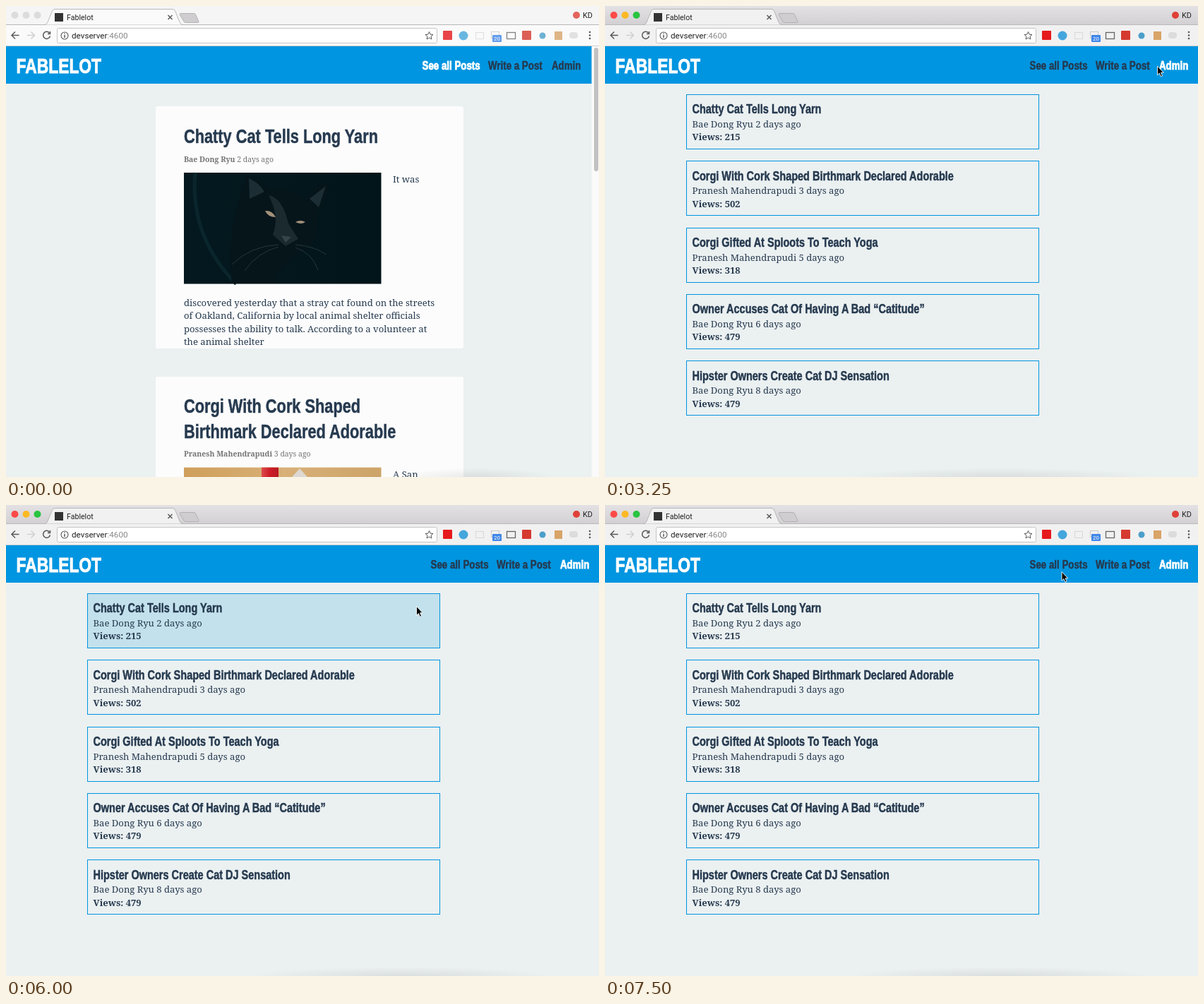
Animation of 840x667 px, one loop 8 s. Source, as an HTML page:

```html
<!DOCTYPE html>
<html lang="en">
<head>
<meta charset="utf-8">
<title>Blog admin walkthrough</title>
<style>
  html, body { margin: 0; width: 100%; height: 100%; overflow: hidden; background: #ebf0f1; }
  svg { display: block; width: 840px; height: 667px; }
  text { fill: #263a4f; white-space: pre; }
  .ui { font-family: Roboto, "Liberation Sans", sans-serif; fill: #222; }
  .display { font-family: "Liberation Sans", Arial, sans-serif; font-weight: bold; stroke: #263a4f; stroke-width: .5px; }
  .active { fill: #fff; stroke: #fff; stroke-width: .9px; }
  .serif { font-family: "Noto Serif", serif; font-size: 13.1px; }
  .bold { font-weight: bold; }
  .byline { font-size: 10.5px; fill: #747474; }
  .line { fill: none; stroke: #5a5a5a; stroke-width: 1.5; }
</style>
</head>
<body>
<svg id="stage" viewBox="0 0 840 667"></svg>
<script>
const LOOP = 8000, BLUE = '#0095e0', CONDENSED = .775;
const SITE = 'Fablelot', CAT_AUTHOR = 'Bae Dong Ryu', DOG_AUTHOR = 'Pranesh Mahendrapudi';

const rect = (x, y, w, h, fill, more = '') =>
  `<rect x="${x}" y="${y}" width="${w}" height="${h}" fill="${fill}" ${more}/>`;
const circle = (x, y, r, fill, more = '') =>
  `<circle cx="${x}" cy="${y}" r="${r}" fill="${fill}" ${more}/>`;
const path = (d, fill, more = '') => `<path d="${d}" fill="${fill}" ${more}/>`;
const line = (d, more = '') => `<path d="${d}" class="line" ${more}/>`;
const text = (str, x, y, cls, more = '') => `<text x="${x}" y="${y}" class="${cls}" ${more}>${str}</text>`;
const display = (str, x, y, size, cls = '') =>
  `<text class="display ${cls}" font-size="${size}" transform="translate(${x} ${y}) scale(${CONDENSED} 1)">${str}</text>`;
const bottomShade = (x, radius) => `<ellipse cx="${x}" cy="668" rx="${radius}" ry="14" fill="url(#shade)"/>`;

// Browser window
const lights = colors => colors.map((c, i) => circle(12.5 + i * 16, 13, 5, c)).join('');
const frame = (strip, bar, lightColors, iconOpacity) =>
  rect(0, 0, 840, 27, strip) + rect(0, 26, 840, 1, '#b9b7b9') + lights(lightColors) +
  path('M246 12q0-1.500 2-1.500h18q2 0 2.500 1.500l4.500 10q.5 1.500-1.500 1.500h-17q-2 0-2.500-1.500z', '#cfcdcf',
    'stroke="#aaa" stroke-width=".8"') +
  path('M54 27q4-1 5-4l6-15q1-3.500 4-3.500h167q3 0 4 3.500l6 15q1 3 5 4z', bar, 'stroke="#aaa" stroke-width=".8"') +
  rect(0, 27, 840, 30, bar) + rect(0, 56, 840, 1, '#cfcfcf') +
  `<g opacity="${iconOpacity}">${extensions}</g>`;

const extensions =
  rect(619, 35, 13, 13, '#e6191c', 'rx="1"') + circle(648, 42, 6.5, '#45a6dc') +
  rect(665.5, 37.5, 11, 9, 'none', 'stroke="#d8d8d8"') +
  rect(687.5, 36.5, 11, 9, 'none', 'stroke="#c8c8c8"') +
  rect(689, 41, 13, 10, '#3f86e8', 'rx="1"') + text('20', 691, 49, 'ui', 'font-size="8" style="fill:#fff"') +
  rect(709.5, 37.5, 12, 9, 'none', 'stroke="#666" stroke-width="1.3"') +
  rect(731, 35, 13, 13, '#d5392f', 'rx="1"') + circle(760, 42, 4.5, '#4c9fca') +
  rect(777, 36, 11, 12, '#d8a468') + rect(798, 37, 12, 9, '#dcdcdc', 'rx="4"') +
  circle(808, 13, 5, '#df4038');

const controls =
  rect(69, 10, 12, 12, '#333') + text(SITE, 86, 19.5, 'ui', 'font-size="10.6"') +
  line('M229.500 13l6 6m0-6l-6 6', 'stroke-width="1.2"') +
  text('KD', 817, 17, 'ui', 'font-size="10.8"') +
  line('M18.500 41.500H8m5-5l-5 5 5 5') + line('M30 41.500h10.500m-5-5l5 5-5 5', 'style="stroke:#d0d0d0"') +
  line('M61.500 38.200a5 5 0 1 0 1 4.300M62.500 36v3.500h-3.500') +
  rect(72.5, 31.5, 538, 21, '#fff', 'rx="2" stroke="#c4c4c4"') +
  line('M83 41v4m0-6.500v1.300', 'stroke-width="1.2"') + circle(83, 42, 5, 'none', 'stroke="#555" stroke-width="1.1"') +
  text('devserver<tspan fill="#888">:4600</tspan>', 93, 45.5, 'ui', 'font-size="11.7"') +
  path('M599.500 36.500l1.600 3.600 3.900.4-2.900 2.600.8 3.900-3.400-2-3.400 2 .8-3.900-2.900-2.600 3.900-.4z', 'none', 'stroke="#555"') +
  [37, 41.5, 46].map(y => circle(827, y, 1.3, '#555')).join('');

// Site pages
const header = (navX, active) => rect(0, 57, 840, 53, BLUE) +
  display(SITE.toUpperCase(), 14.5, 94.5, 29.5, 'active') +
  ['See all Posts', 'Write a Post', 'Admin'].map((label, i) =>
    display(label, navX + [0, 93.5, 183.5][i], 90.2, 17.2, i === active ? 'active' : '')).join('');

const byline = (author, age, y) =>
  text(`<tspan class="bold">${author}</tspan> ${age}`, 252, y, 'serif byline');

const catPhoto = rect(252, 236, 279.5, 157.5, 'url(#night)') +
  path('M268 236q-8 90 58 157.500', 'none', 'stroke="#0a262c" stroke-width="5"') +
  path('M320 393q-10-70 22-155 18 6 32 22 28-4 50 12 14-20 34-22-2 24-16 44 4 52-34 60-20 10-26 39z', '#06151a') +
  path('M344 244q14 6 22 19l-21 10zM453 255l-23 18 13 12z', '#1c2e33') +
  path('M372 268q20 4 28 40l14 22-18 10-18-16q10-26-6-56z', '#1b2a2e') +
  path('M367 290q10-1 15 9-11 0-15-9zM410 306q7-4 14 0-6 4-14 0z', '#a3917a') +
  path('M390 325l14 2-8 8z', '#35444a') +
  path('M386 338q-40 2-66 28M386 341q-30 8-48 34M410 342q24 8 32 32M410 338q26 2 44 14', 'none',
    'stroke="#30474c" stroke-width=".7"');

const dogPhoto = rect(252, 653.5, 279.5, 14, 'url(#sand)') +
  rect(362, 653.5, 24, 14, 'url(#red)') + path('M416 655l11 12h-22z', '#ddd8d3');

const excerpt = [
  'discovered yesterday that a stray cat found on the streets',
  'of Oakland, California by local animal shelter officials',
  'possesses the ability to talk. According to a volunteer at',
  'the animal shelter'];

const home = header(589.5, 0) +
  rect(212, 142, 436, 343, '#fcfcfc', 'rx="3"') + rect(212, 525, 436, 160, '#fcfcfc', 'rx="3"') +
  display('Chatty Cat Tells Long Yarn', 252, 194, 28.1) + byline(CAT_AUTHOR, '2 days ago', 220.8) +
  catPhoto + text('It was', 548, 250, 'serif') +
  excerpt.map((str, i) => text(str, 252, 425 + i * 18.4, 'serif')).join('') +
  display('Corgi With Cork Shaped', 252, 576, 28.1) + display('Birthmark Declared Adorable', 252, 611.5, 28.1) +
  byline(DOG_AUTHOR, '3 days ago', 638.3) + dogPhoto + text('A San', 548, 668, 'serif') +
  bottomShade(665, 115) +
  rect(829.5, 57, 10.5, 610, '#fafafa') + rect(833, 59, 6, 175, '#c1c1c1', 'rx="3"');

const posts = [
  ['Chatty Cat Tells Long Yarn', CAT_AUTHOR, 2, 215],
  ['Corgi With Cork Shaped Birthmark Declared Adorable', DOG_AUTHOR, 3, 502],
  ['Corgi Gifted At Sploots To Teach Yoga', DOG_AUTHOR, 5, 318],
  ['Owner Accuses Cat Of Having A Bad “Catitude”', CAT_AUTHOR, 6, 479],
  ['Hipster Owners Create Cat DJ Sensation', CAT_AUTHOR, 8, 479]];

const admin = header(601.5, 2) + posts.map(([title, author, days, views], i) => {
  const y = 125 + i * 94.35;
  return rect(115.5, Math.round(y) + .5, 499, 77, 'none', `stroke="${BLUE}" ${i ? '' : 'id="firstPost"'}`) +
    display(title, 123.5, y + 27.3, 18.7) +
    text(`${author} ${days} days ago`, 123.5, y + 46.8, 'serif') +
    text(`Views: ${views}`, 123.5, y + 65.2, 'serif bold');
}).join('') + bottomShade(560, 220);

const gradient = (type, id, attrs, ...stops) => `<${type}Gradient id="${id}" ${attrs}>` +
  stops.map(([color, opacity = 1], i) =>
    `<stop offset="${i / (stops.length - 1)}" stop-color="${color}" stop-opacity="${opacity}"/>`).join('') +
  `</${type}Gradient>`;

document.getElementById('stage').innerHTML = '<defs>' +
  gradient('linear', 'strip', 'x2="0" y2="1"', ['#e3e1e3'], ['#d2d0d2']) +
  gradient('linear', 'night', '', ['#04191f'], ['#03171d'], ['#00141a']) +
  gradient('linear', 'sand', '', ['#cf9f5a'], ['#d8b078'], ['#cda468']) +
  gradient('linear', 'red', '', ['#dc4a4c'], ['#cc1c28'], ['#b81a24']) +
  gradient('radial', 'shade', '', ['#000', .08], ['#000', .04], ['#000', 0]) + '</defs>' +
  rect(0, 0, 840, 667, '#ebf0f1') +
  `<g id="homePage">${home}</g><g id="adminPage">${admin}</g>` +
  `<g id="idleFrame">${frame('#f5f5f5', '#fafafa', Array(3).fill('#dcdcdc'), .8)}</g>` +
  `<g id="liveFrame">${frame('url(#strip)', '#f2f1f2', ['#fc4a48', '#fdb924', '#29c440'], 1)}</g>` + controls +
  path('M.5.5v12.800l2.900-2.700 2 4.700 2.200-.9-2-4.600h3.600z', '#000', 'id="cursor" stroke="#fff" stroke-width=".9"');

// Cursor steps: time, x, y
const steps = [
  [0, 662, -15], [250, 664, -7], [500, 775, 77], [750, 782, 84.5],
  [4000, 206.5, 153], [4250, 204.5, 172.5], [4500, 191, 190],
  [5500, 467.5, 142], [5750, 493.5, 142.5], [6000, 581, 143], [6250, 626, 124],
  [6500, 646, 101], [7000, 646, 94], [7250, 646, 93], [7500, 646.5, 94]];

const find = id => document.getElementById(id);
const show = (id, on) => find(id).setAttribute('visibility', on ? 'visible' : 'hidden');

function draw() {
  const t = performance.now() % LOOP;
  const [, x, y] = steps.findLast(step => step[0] <= t);
  find('cursor').setAttribute('transform', `translate(${x} ${y})`);
  show('idleFrame', t < 1250);
  show('liveFrame', t >= 1250);
  show('homePage', t < 3250);
  show('adminPage', t >= 3250);
  find('firstPost').setAttribute('fill', t >= 4000 && t < 6250 ? '#c3e1ec' : 'none');
  requestAnimationFrame(draw);
}
draw();
</script>
</body>
</html>
```
